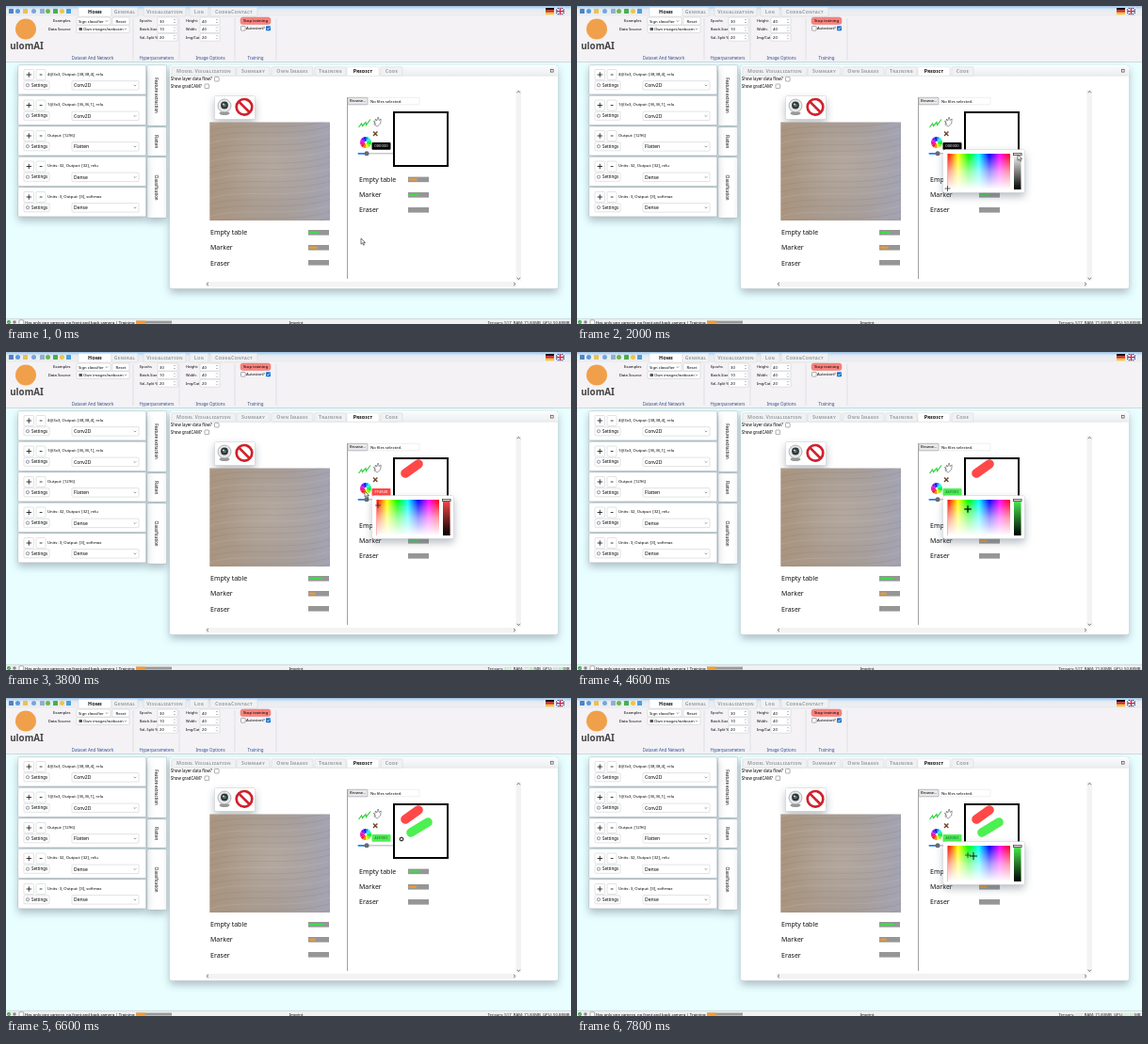
An HTML page that plays this animation: 600 by 338 pixels, repeating every 8 s.

```html
<!DOCTYPE html>
<html lang="en">
<head>
<meta charset="utf-8">
<title>Training a sign classifier</title>
<style>
  html, body { margin: 0; width: 100%; height: 100%; overflow: hidden; background: #fff; }
  svg { display: block; width: 100%; height: 100%; }
  text { font-family: "Noto Sans", "Open Sans", sans-serif; white-space: pre; }
  .tab { font-variant: small-caps; letter-spacing: .22px; }
  .lift { filter: drop-shadow(0 .7px .6px #56606a99) drop-shadow(0 4px 4px #5d6c7870); }
</style>
</head>
<body>
<svg id="stage" viewBox="0 0 600 338" preserveAspectRatio="none"></svg>
<script>
const LOOP = 8000, STEP = 200;
const RED = '#ff4848', GREEN = '#4cf051', ORANGE = '#f39a2d', BAR_GREEN = '#3fdc4b';

// Markup helpers; text is centred vertically on y.
const rect = (x, y, w, h, fill, more = '') =>
  `<rect x="${x}" y="${y}" width="${w}" height="${h}" fill="${fill}" ${more}/>`;
const circle = (x, y, r, fill, more = '') =>
  `<circle cx="${x}" cy="${y}" r="${r}" fill="${fill}" ${more}/>`;
const path = (d, stroke, width = .5, more = '') =>
  `<path d="${d}" fill="none" stroke="${stroke}" stroke-width="${width}" ${more}/>`;
const text = (x, y, string, size = 4.2, more = '') =>
  `<text x="${x}" y="${y + size * .36}" font-size="${size}" ${more}>${string}</text>`;
const middle = 'text-anchor="middle"';
const box = (x, y, w, h, fill = '#fff', stroke = '#c3c6ca', radius = 1) =>
  rect(x, y, w, h, fill, `rx="${radius}" stroke="${stroke}" stroke-width=".5"`);
const lift = content => `<g class="lift">${content}</g>`;
const chevron = (x, y) => path(`M${x - 1.3} ${y - .6}l1.3 1.3 1.3 -1.3`, '#444', .5);
const gradient = (id, direction, ...stops) =>
  `<linearGradient id="${id}" x2="${direction === 'x' ? 1 : 0}" y2="${direction === 'y' ? 1 : 0}">` +
  stops.map((color, i) =>
    `<stop offset="${i / (stops.length - 1)}" stop-color="${color}"/>`).join('') +
  '</linearGradient>';

const select = (x, y, w, label, size = 4.2, h = 8, indent = 2) =>
  box(x, y, w, h) + text(x + indent, y + h / 2, label, size) + chevron(x + w - 4, y + h / 2);
const checkbox = (x, y) =>
  rect(x, y, 4.6, 4.6, '#fff', 'rx=".7" stroke="#777" stroke-width=".6"');

function tab(x, w, y, label, active) {
  const shape = box(x, y - 4.5, w, 9.5, active ? '#fff' : '#f0f1f3', '#d3d6da');
  const style = active ? 'font-weight="700" fill="#111"' : 'font-weight="600" fill="#a0a2a5"';
  return shape + text(x + w / 2, y, label, 5.25, `class="tab" ${middle} ${style}`);
}

function toolbar() {
  const icons = [['#4d84c4', 3], ['#5a97dc', 10], ['#e9c157', 18], ['#78a6d8', 27],
    ['#91b0c8', 36], ['#69b84d', 42], ['#4cae4c', 50], ['#efc540', 57], ['#4aa1df', 64]];
  const groups = [[92, 'Dataset And Network', 135], [160, 'Hyperparameters', 184],
    [217, 'Image Options', 243], [265, 'Training', 287]];
  const field = (label, value, x, inputX, row) => {
    const y = 16 + row * 8.6;
    return text(x, y, label, 3.8) + box(inputX, y - 4, 21, 8) + text(inputX + 2, y, value) +
      path(`M${inputX + 17} ${y - 1}l1 -1 1 1m-2 2l1 1 1 -1`, '#555', .4);
  };
  return rect(0, 0, 600, 11, 'url(#title)') + rect(0, 10.5, 600, 49, '#f4f2f5') +
    rect(0, 59, 600, .7, '#c4cad1') +
    icons.map(([color, x], i) => i % 2
      ? circle(x + 2.5, 5.5, 2.5, color) : rect(x, 3, 5, 5, color, 'rx=".6"')).join('') +
    tab(77, 35, 6, 'Home', true) + tab(112, 28, 6, 'General') +
    tab(146, 45, 6, 'Visualization') + tab(195, 20, 6, 'Log') +
    tab(217, 50, 6, 'Code&amp;Contact') +
    ['#111', '#d22', '#f4c62c'].map((c, i) => rect(573, 2 + i * 2.4, 9, 2.4, c)).join('') +
    rect(584, 2, 9, 7.2, '#26428b') +
    path('M584 2l9 7.2M593 2l-9 7.2', '#fff', 1.2) +
    path('M588.5 2v7.2M584 5.6h9', '#fff', 2.4) +
    path('M588.5 2v7.2M584 5.6h9', '#d2203a', 1.2) +
    circle(21, 24.5, 11, '#f0a04b') +
    text(22, 42.5, 'ulomAI', 9.8, `${middle} font-weight="600" fill="#444"`) +
    text(68.5, 16, 'Examples', 4.1, 'text-anchor="end"') +
    text(68.5, 24, 'Data Source', 4.2, 'text-anchor="end"') +
    select(75, 12, 36, 'Sign classifier', 4.2) + box(113, 12, 18, 8) +
    text(122, 16, 'Reset', 4.2, middle) +
    select(75, 20.5, 56, 'Own images/webcam', 4.2, 8, 7) + rect(77.5, 23, 3.5, 3, '#555', 'rx=".5"') +
    field('Epochs', 30, 142, 161, 0) + field('Batch-Size', 10, 142, 161, 1) +
    field('Val.-Split %', 20, 142, 161, 2) + field('Height:', 40, 191, 206, 0) +
    field('Width:', 40, 191, 206, 1) + field('Img/Cat', 20, 191, 206, 2) +
    box(249, 12, 32, 7.5, '#fa827d', '#d97872', 2.5) +
    text(265, 15.8, 'Stop training', 4.3, middle) +
    checkbox(249.5, 21.5) + text(255, 24, 'Autostart?', 4.1) +
    rect(276, 21.3, 5, 5, '#1775d1', 'rx=".8"') + path('M277 23.8l1.2 1.2 2 -2.5', '#fff', .7) +
    groups.map(([x, label, edge]) => text(x, 55.3, label, 4.45, `${middle} fill="#31508f"`) +
      path(`M${edge} 13v44`, '#d2d5da', .6)).join('');
}

function layers() {
  const rows = [['4@3x3, Output: [38,38,4], relu', 'Conv2D'],
    ['1@3x3, Output: [36,36,1], relu', 'Conv2D'], ['Output: [1296]', 'Flatten'],
    ['Units: 32, Output: [32], relu', 'Dense'], ['Units: 3, Output: [3], softmax', 'Dense']];
  const sides = [[63, 64, 'Feature extraction'], [129, 30, 'Flatten'], [161, 64, 'Classification']];
  return lift(sides.map(([y, h, label]) => box(150, y, 20.5, h, '#fff', '#dde2e5') +
      `<g transform="translate(160 ${y + h / 2}) rotate(90)">${text(0, 0, label, 4.4, middle)}</g>`
    ).join('')) +
    lift(rows.map(([info, kind], i) => {
      const y = 63 + i * 32.5;
      return box(13, y, 135.5, 30.8, '#fff', '#dde2e5') + box(19, y + 4.5, 10.5, 11) +
        path(`M21.6 ${y + 10}h5.4m-2.7 -2.7v5.4`, '#111', .8) + box(32, y + 4.5, 10, 11) +
        path(`M35.7 ${y + 10}h2.8`, '#111', .8) + text(44, y + 9.3, info, 4.25) +
        box(19, y + 16.8, 27, 9) + circle(23, y + 21.2, 1.7, '#eef', 'stroke="#667" stroke-width=".6"') +
        text(27, y + 21.2, 'Settings', 4.5) + select(70, y + 16.6, 71, kind, 5, 9.5);
    }).join(''));
}

function panel() {
  const wheel = Array.from({ length: 12 }, (_, i) => {
    const point = a => `${382 + 6 * Math.cos(a)} ${145 + 6 * Math.sin(a)}`;
    return `<path d="M382 145L${point(i * Math.PI / 6)}A6 6 0 0 1 ${point((i + 1) * Math.PI / 6)}Z"
      fill="hsl(${120 - i * 30} 90% 52%)"/>`;
  }).join('');
  const labels = (x, y) => ['Empty table', 'Marker', 'Eraser']
    .map((name, i) => text(x, y + i * 16.1, name, 7, 'fill="#111"')).join('');
  return lift(rect(174, 63, 412, 237.5, '#fff', 'rx="2"')) +
    rect(174.5, 64, 411, 10, 'url(#strip)') + path('M175 74.2h411', '#d0d3d6') +
    tab(176, 68, 69.2, 'Model Visualization') + tab(245, 35, 69.2, 'Summary') +
    tab(282, 44, 69.2, 'Own Images') + tab(328, 33, 69.2, 'Training') +
    tab(362, 34, 69.2, 'Predict', true) + tab(398, 23, 69.2, 'Code') +
    rect(578.3, 67.3, 2.8, 2.8, '#fff', 'stroke="#444" stroke-width=".7"') +
    text(174.8, 77.7, 'Show layer data flow?', 4.35) + checkbox(221.5, 75.4) +
    text(174.8, 85.5, 'Show gradCAM?', 4.35) + checkbox(211, 83) +
    lift(rect(221.5, 95.5, 43, 25, '#fff', 'rx="1.5"')) +
    `<ellipse cx="232" cy="114" rx="5.5" ry="2" fill="#999"/>` +
    circle(232, 106, 7, '#e6e8e8', 'stroke="#8a8c8c" stroke-width=".6"') +
    circle(232, 105.5, 3.9, '#303538') + circle(232, 105.5, 1.8, '#56776f') +
    circle(230.9, 104.4, .8, '#fff') +
    circle(253, 107.3, 8.3, 'none', 'stroke="#d0212b" stroke-width="2.7"') +
    path('M247.3 101.6l11.4 11.4', '#d0212b', 2.7) +
    labels(217, 240.8) + labels(375, 184.5) +
    path('M362.5 97v193', '#777', .7) +
    box(363, 97.3, 76, 7.5, '#fff', '#ddd') + box(363, 97.3, 21, 7.5, '#e9e9ed', '#888') +
    text(365, 101, 'Browse...', 4.1) + text(387, 101, 'No files selected.', 4.2) +
    path('M374.5 129l3 -4 1 2.5 3.5 -4 .5 3 4.5 -6', '#35cf43', 1.2) +
    path('M391 126l1.5 -6 1.2 2 1.5 -4 1 3.5 2 -1.5 -.5 5 -3.5 3zM390 122l3 4', '#555', .6) +
    path('M390 133.6l4.4 4.4m0 -4.4l-4.4 4.4', '#70452d', 1.4) +
    wheel + circle(382, 145, 1.2, '#fff') +
    path('M374 156.8h37', '#c7c9cc', 1.4, 'stroke-linecap="round"') +
    path('M374.5 156.8h8', '#1c86ee', 1.8, 'stroke-linecap="round"') +
    circle(383, 156.8, 2.5, '#686b74') +
    rect(412, 113, 57, 57, '#fff', 'stroke="#000" stroke-width="2"') +
    rect(541.5, 89, 5.5, 203, '#f3f3f4') + rect(212, 293, 330, 5.5, '#f3f3f4') +
    path('M215 293.9l-1.8 1.7 1.8 1.7M539 293.9l1.8 1.7 -1.8 1.7' +
      'M542.6 92.2l1.7 -1.8 1.7 1.8M542.6 288.8l1.7 1.8 1.7 -1.8', '#555', .8);
}

function footer() {
  return rect(0, 332.5, 600, 6, '#f0f1f2') + path('M0 332.6h600', '#b7bbbd', .5) +
    circle(3, 336, 2, '#2da43c') + path('M2 336l.8 .8 1.3 -1.6', '#fff', .5) +
    circle(9, 336, 1.8, '#888') + checkbox(14, 333.8) +
    text(20, 336, 'Has only one camera, no front and back camera | Training:', 4.25) +
    rect(138, 334.6, 38, 3, '#999') + rect(138, 334.6, 10, 3, ORANGE) +
    text(308, 336, 'Imprint', 4.25, middle);
}

const defs = `<defs>
  ${gradient('title', 'y', '#9dc3e6', '#e4ebf3', '#eceef1', '#e9ebee')}
  ${gradient('strip', 'y', '#fafafb', '#eceef1')}
  ${gradient('hues', 'x', '#f00', '#ff0', '#0f0', '#0ff', '#00f', '#f0f', '#f00')}
  ${gradient('wash', 'y', '#fff0', '#ffffff98', '#fff')}
  ${gradient('shade', 'y', '#0000', '#000')}
  ${gradient('desk', 'x', '#a9947f', '#a99b8e', '#a79e9a', '#a3a4b4')}
  <radialGradient id="glow"><stop stop-color="#c9beb4" stop-opacity=".35"/>
    <stop offset="1" stop-color="#c9beb4" stop-opacity="0"/></radialGradient>
  <clipPath id="video">${rect(216.3, 123.5, 127.7, 104.5, '#000')}</clipPath>
  <clipPath id="sheet">${rect(413, 114, 55, 55, '#000')}</clipPath>
</defs>`;

const stage = document.getElementById('stage');
stage.innerHTML = defs + rect(0, 60, 600, 278, '#e8feff') + toolbar() + layers() +
  panel() + footer() + '<g id="live"></g>';
const live = document.getElementById('live');

// Keys are [time, ...values]; values run linearly between neighbours.
function track(keys, t) {
  const next = keys.findIndex(key => key[0] > t);
  if (next < 0) return keys[keys.length - 1].slice(1);
  if (next === 0) return keys[0].slice(1);
  const from = keys[next - 1], to = keys[next];
  const f = (t - from[0]) / (to[0] - from[0]);
  return from.slice(1).map((v, i) => v + (to[i + 1] - v) * f);
}

const pointerKeys = [[0, 377, 247], [200, 377, 247], [800, 390, 151], [1200, 388, 152],
  [1600, 468, 193], [2000, 468, 158], [2400, 395, 163], [2800, 438, 118], [3400, 424, 129],
  [3800, 381, 148], [4400, 415, 167], [5600, 415, 167], [5800, 448, 132], [6400, 430, 143],
  [6600, 420, 150], [7200, 381, 148], [7800, 421, 168]];
const markerKeys = [[2000, 393.5, 194], [2400, 395, 163], [4000, 395, 163], [4400, 415, 167]];
const handleKeys = [[1600, 194], [2000, 157.5]];

function video(t) {
  const drift = Math.sin(t / 700);
  const grain = Array.from({ length: 18 }, (_, i) => {
    const y = 120 + i * 6.5;
    return path(`M214 ${y + 7}C250 ${y - 5 + drift} 300 ${y + 9} 346 ${y - 6}`,
      i % 3 ? '#857465' : '#cfc6c0', .8, 'opacity=".25"');
  }).join('');
  return `<g clip-path="url(#video)">${rect(216, 123, 129, 106, 'url(#desk)')}
    <ellipse cx="${283 + drift}" cy="172" rx="58" ry="48" fill="url(#glow)"/>${grain}</g>`;
}

function bar(x, y, fill, color) {
  return rect(x, y, 22, 5.6, '#969696') + rect(x + .7, y + 1.7, fill, 2.2, color);
}

function bars(t) {
  const drawn = t >= 4200;
  const [sure] = track([[0, 10], [2800, 11], [3800, 14], [6600, 15]], t);
  return bar(321, 238, sure, BAR_GREEN) + bar(321, 254, sure < 12 ? 9 : 7, ORANGE) +
    bar(321, 270, 0, ORANGE) +
    bar(427, 181.6, drawn ? 12 : 9, drawn ? BAR_GREEN : ORANGE) +
    bar(427, 198, drawn ? 8 : 10.5, drawn ? ORANGE : BAR_GREEN) + bar(427, 214, 0, ORANGE);
}

function stroke(t, start, end, x1, y1, x2, y2, color) {
  if (t <= start) return '';
  const f = Math.min(1, (t - start) / (end - start));
  return path(`M${x1} ${y1}L${x1 + (x2 - x1) * f} ${y1 + (y2 - y1) * f}`,
    color, 9.6, 'stroke-linecap="round"');
}

function picker(t, color) {
  const [x, y] = track(markerKeys, t), [handle] = track(handleKeys, t);
  return lift(rect(389, 152.5, 86.5, 46, '#fff', 'rx="2.5"')) +
    rect(393.5, 157, 66.5, 38, 'url(#hues)') + rect(393.5, 157, 66.5, 38, 'url(#wash)') +
    path(`M${x - 3} ${y}h6m-3 -3v6`, '#222', .7) +
    rect(464, 157, 7.5, 38, color) + rect(464, 157, 7.5, 38, 'url(#shade)') +
    rect(463.4, handle - 1.2, 8.7, 2.4, '#ddd', 'stroke="#222" stroke-width=".6"');
}

function pointer(t, open) {
  const [x, y] = track(pointerKeys, t);
  const painting = x > 412 && y < 170 && (!open || y < 153);
  if (painting) return circle(x, y, 1.9, '#fff', 'stroke="#000" stroke-width="1"');
  if (open && x > 393 && y > 156 && x < 460) return path(`M${x - 4} ${y}h8m-4 -4v8`, '#000', .9);
  return `<path d="M${x} ${y}v6.2l1.5 -1.4 1.1 2.4 1.1 -.5 -1.1 -2.3h2z"
    fill="#fff" stroke="#222" stroke-width=".6"/>`;
}

function memory(t) {
  const flash = t >= 1000 && t < 1400 ? ['#e33', '#222', '#222']
    : t >= 2600 && t < 4400 ? ['#5fe36c', t < 3400 ? '#e89a55' : '#5fe36c', '#5fe36c']
    : t >= 5200 && t < 6200 || t >= 7400 ? ['#8bec91', '#222', '#8bec91']
    : ['#222', '#222', '#222'];
  const value = (i, string) => `<tspan fill="${flash[i]}">${string}</tspan>`;
  return text(598.5, 336, `Tensors: ${value(0, '517')}, RAM: ${value(1, '71.83')}MB, ` +
    `GPU: ${value(2, '50.88')}MB`, 4.25, 'text-anchor="end" fill="#222"');
}

function draw(t) {
  const open = t >= 1000 && t < 3000 || t >= 3800 && t < 5800 || t >= 7400;
  const [color, code] = t < 2200 ? ['#000', '000000']
    : t < 4400 ? [RED, 'FF4848'] : [GREEN, '4CF051'];
  live.innerHTML = video(t) + bars(t) + memory(t) +
    `<g clip-path="url(#sheet)">${stroke(t, 2800, 3400, 438, 119, 424, 129, RED)}
      ${stroke(t, 5800, 6400, 448, 132, 430, 143, GREEN)}</g>` +
    rect(388.5, 145, 20, 7.8, color, 'rx="1"') +
    text(398.5, 148.9, code, 4.2, `${middle} fill="${t < 4400 ? '#fff' : '#153'}"`) +
    (open ? picker(t, t < 2200 ? '#fff' : color) : '') + pointer(t, open);
}

let shown = -1;
function tick(now) {
  const t = Math.floor(now % LOOP / STEP) * STEP;
  if (t !== shown) draw(shown = t);
  requestAnimationFrame(tick);
}
draw(0);
requestAnimationFrame(tick);
</script>
</body>
</html>
```
